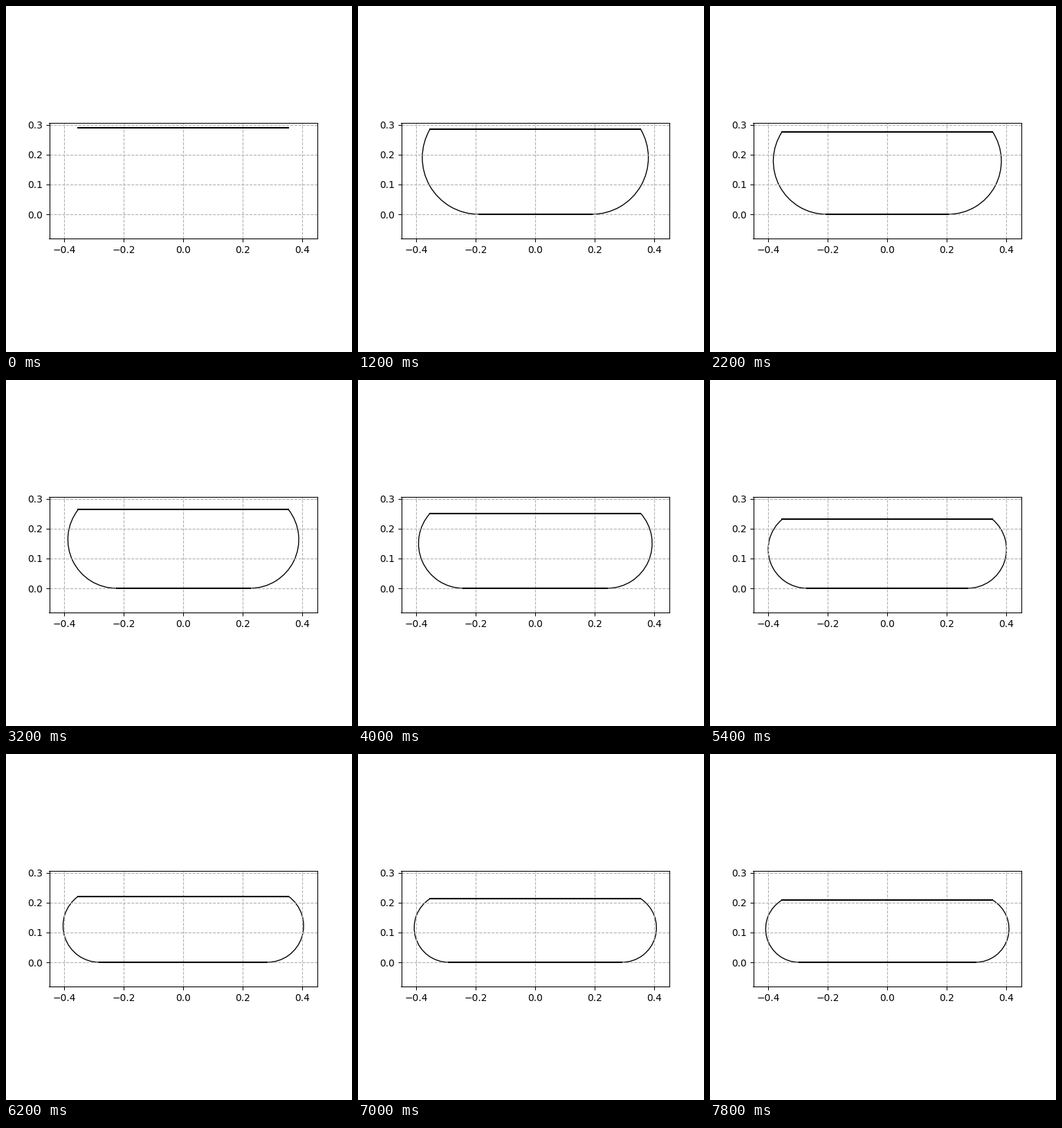
These frames come from a looping animation (500x500 px, 8000 ms). A matplotlib script:

```python
import numpy as np
import matplotlib.pyplot as plt
from matplotlib.animation import FuncAnimation
from matplotlib.patches import PathPatch
from matplotlib.path import Path

FRAMES, INTERVAL = 40, 200
HALF_TOP = 0.353              # half width of the plate
HALF_LEN = 3 * np.pi / 16     # half length of the membrane
START = 0.29                  # height of the plate at rest
PRESSURE, GRAVITY, DAMPING = 20.0, 10.0, 0.95
STEP, SUBSTEPS, DELAY = 0.001, 10, 8


def membrane(y):
    """Arc angle, arc radius and half contact width for plate height y."""
    ratio = (HALF_LEN - HALF_TOP) / y
    lo, hi = 0.5, 4.0
    for _ in range(40):
        phi = (lo + hi) / 2
        if (phi - np.sin(phi)) / (1 - np.cos(phi)) < ratio:
            lo = phi
        else:
            hi = phi
    r = y / (1 - np.cos(phi))
    return phi, r, HALF_TOP - r * np.sin(phi)


def plate_heights():
    y, v = START, 0.0
    track = [y]
    for _ in range(FRAMES * SUBSTEPS):
        contact = 2 * membrane(y)[2]
        v += (PRESSURE * contact - GRAVITY - DAMPING * v) * STEP
        y += v * STEP
        track.append(y)
    return [track[max(0, n * SUBSTEPS - DELAY)] for n in range(FRAMES)]


def arc_path(cx, r, start, end):
    unit = Path.arc(np.degrees(start), np.degrees(end))
    return Path(unit.vertices * r + [cx, r], unit.codes)


heights = plate_heights()

fig, ax = plt.subplots(figsize=(5, 5), dpi=100)
ax.set_aspect("equal")
ax.set_xlim(-0.45, 0.45)
ax.set_ylim(-0.0813, 0.3066)
ax.set_xticks([-0.4, -0.2, 0, 0.2, 0.4])
ax.set_yticks([0, 0.1, 0.2, 0.3])
ax.grid(linestyle="--")

top, = ax.plot([], [], color="black", lw=1.5)
bottom, = ax.plot([], [], color="black", lw=1.5)
arcs = [PathPatch(arc_path(0, 0.1, 0, 1), fill=False, ec="black", lw=1)
        for _ in range(2)]
for arc in arcs:
    ax.add_patch(arc)


def update(n):
    y = heights[n]
    phi, r, half = membrane(y)
    down = 1.5 * np.pi
    top.set_data([-HALF_TOP, HALF_TOP], [y, y])
    bottom.set_data([-half, half], [0, 0])
    arcs[0].set_path(arc_path(-half, r, down - phi, down))
    arcs[1].set_path(arc_path(half, r, down, down + phi))
    # only the plate is there at the very start
    for part in (bottom, *arcs):
        part.set_visible(n > 0)
    return top, bottom, *arcs


anim = FuncAnimation(fig, update, frames=FRAMES, interval=INTERVAL,
                     repeat=True, repeat_delay=0)
plt.show()
```
